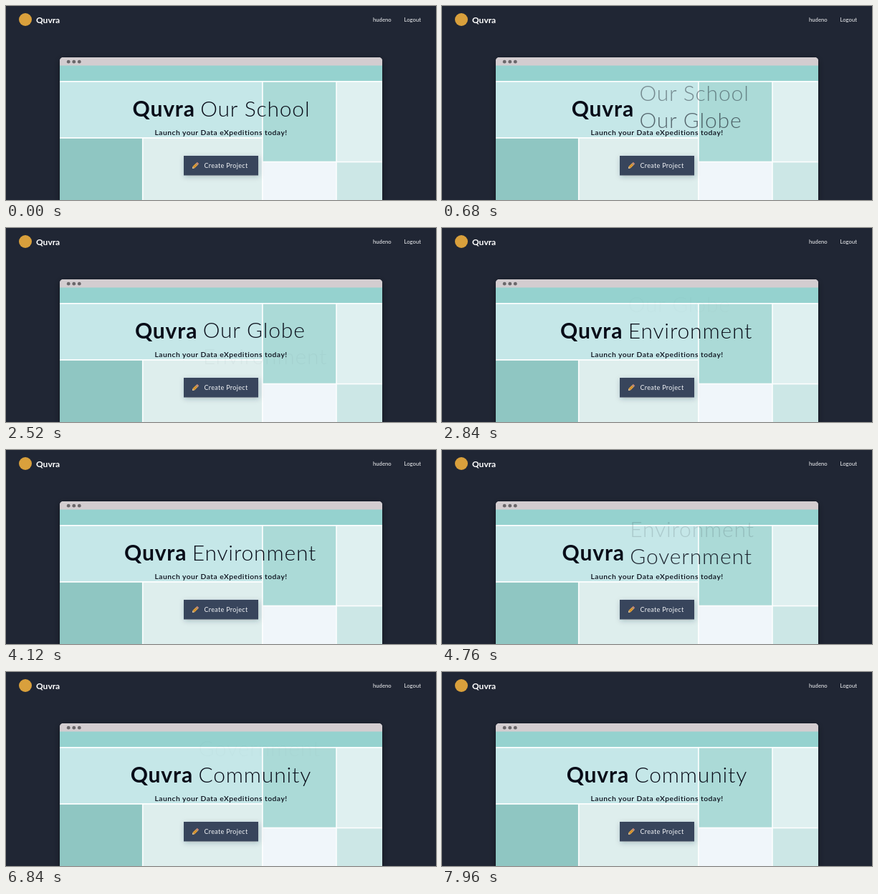
An HTML page that plays this animation: 600x272 px, repeating every 8 s.

```html
<!DOCTYPE html>
<html lang="en">
<head>
<meta charset="utf-8">
<title>Our School</title>
<style>
  html, body { margin: 0; width: 100%; height: 100%; overflow: hidden; background: #202634; }
  svg { display: block; width: 100%; height: 100%; font-family: Lato, sans-serif; }
  .nav { font-size: 7.7px; fill: #f4f5f7; }
  .brand { font-size: 12px; font-weight: 700; fill: #fff; }
  .title { font-size: 30px; letter-spacing: .85px; fill: #080c18; }
  .name { font-weight: 700; }
  .phrase { font-weight: 300; }
  .sub { font-size: 10.3px; font-weight: 600; letter-spacing: .5px; fill: #080c18; }
  .label { font-size: 9px; letter-spacing: .33px; fill: #f2f4f7; }
</style>
</head>
<body>
<svg viewBox="0 0 600 272" xmlns="http://www.w3.org/2000/svg">
  <defs>
    <filter id="glow" x="-10%" y="-15%" width="120%" height="130%">
      <feDropShadow dx="0" dy="2" stdDeviation="5" flood-color="#0a0e18" flood-opacity=".4"/>
    </filter>
    <filter id="lift" x="-20%" y="-60%" width="140%" height="240%">
      <feDropShadow dx="1" dy="2" stdDeviation="3.8" flood-color="#26354a" flood-opacity=".26"/>
    </filter>
  </defs>

  <rect width="600" height="272" fill="#202634"/>
  <circle cx="27" cy="19" r="9" fill="#d9a03c"/>
  <text class="brand" x="42" y="23.8">Quvra</text>
  <text class="nav" x="512" y="21.8">hudeno</text>
  <text class="nav" x="555.6" y="21.8">Logout</text>

  <path d="M75 290V77a5 5 0 0 1 5-5H520a5 5 0 0 1 5 5V290Z" fill="#fcfefe" filter="url(#glow)"/>
  <path d="M75 84V77a5 5 0 0 1 5-5H520a5 5 0 0 1 5 5V84Z" fill="#d3cdd0"/>
  <g fill="#6a676a">
    <circle cx="87.2" cy="78.2" r="2.4"/>
    <circle cx="94.8" cy="78.2" r="2.4"/>
    <circle cx="102.3" cy="78.2" r="2.4"/>
  </g>
  <rect x="75" y="83.5" width="450" height="21.5" fill="#95d2cf"/>
  <rect x="75" y="106.7" width="282" height="77.3" fill="#c5e7e8"/>
  <rect x="358.7" y="106.7" width="101.5" height="111" fill="#abdad7"/>
  <rect x="461.8" y="106.7" width="63.2" height="111" fill="#dff0f0"/>
  <rect x="75" y="185.8" width="114.9" height="87" fill="#8fc6c2"/>
  <rect x="191.5" y="185.8" width="165.5" height="87" fill="#deeeed"/>
  <rect x="358.7" y="219.4" width="101.5" height="53" fill="#f0f6fa"/>
  <rect x="461.8" y="219.4" width="63.2" height="53" fill="#cce7e6"/>

  <text id="name" class="title name" y="155">Quvra</text>
  <text id="old" class="title phrase"></text>
  <text id="now" class="title phrase"></text>
  <text class="sub" x="300" y="181" text-anchor="middle">Launch your Data eXpeditions today!</text>

  <rect x="248" y="210" width="104" height="27.5" fill="#38455b" filter="url(#lift)"/>
  <g transform="translate(264 224) rotate(-45)">
    <path d="M-5.8 0L-3.2-1.8V1.8Z" fill="#ecd0a0"/>
    <rect x="-3.2" y="-1.8" width="6.4" height="3.6" fill="#e5a23a"/>
    <path d="M-3.2 0H3.2" stroke="#b97822" stroke-width=".8"/>
    <rect x="3" y="-1.8" width="1" height="3.6" fill="#a8a6a4"/>
    <rect x="4" y="-1.8" width="1.6" height="3.6" rx=".7" fill="#d98a70"/>
  </g>
  <text class="label" x="276.4" y="227.2">Create Project</text>
</svg>
<script>
  const LOOP = 8000, BASE = 155, LINE = 37.5, SHIFT = 150, NAME_GAP = 94.7;

  // Each phrase: start time in ms and resting left edge
  const phrases = [
    { text: 'Our School', at: -2000, x: 271.2 },
    { text: 'Our Globe', at: 545, x: 275.5 },
    { text: 'Environment', at: 2500, x: 259.7 },
    { text: 'Government', at: 4535, x: 262.3 },
    { text: 'Community', at: 6500, x: 268.4 }
  ];

  const $ = id => document.getElementById(id);
  const nameText = $('name'), oldText = $('old'), nowText = $('now');

  // Slightly underdamped spring from 0 to 1
  const DECAY = 11.1, FREQ = 6.87;
  const spring = s => 1 - Math.exp(-DECAY * s) *
    (Math.cos(FREQ * s) + DECAY / FREQ * Math.sin(FREQ * s));
  const smooth = u => u * u * (3 - 2 * u);

  function place(el, text, x, y, opacity) {
    el.textContent = text;
    el.setAttribute('x', x);
    el.setAttribute('y', y);
    el.setAttribute('opacity', opacity);
  }

  function draw(t) {
    const i = phrases.findLastIndex(p => t >= p.at);
    const now = phrases[i], old = phrases[Math.max(i - 1, 0)];
    const age = t - now.at;
    const p = age > 800 ? 1 : spring(age / 1000);
    const x = old.x + (now.x - old.x) * smooth(Math.min(age / SHIFT, 1));
    nameText.setAttribute('x', x - NAME_GAP);
    place(oldText, old.text, x, BASE - LINE * p, Math.max(1 - p, 0));
    place(nowText, now.text, x, BASE + LINE * (1 - p), Math.min(p, 1));
  }

  const start = performance.now();
  function tick() {
    draw((performance.now() - start) % LOOP);
    requestAnimationFrame(tick);
  }
  draw(0);
  requestAnimationFrame(tick);
</script>
</body>
</html>
```
